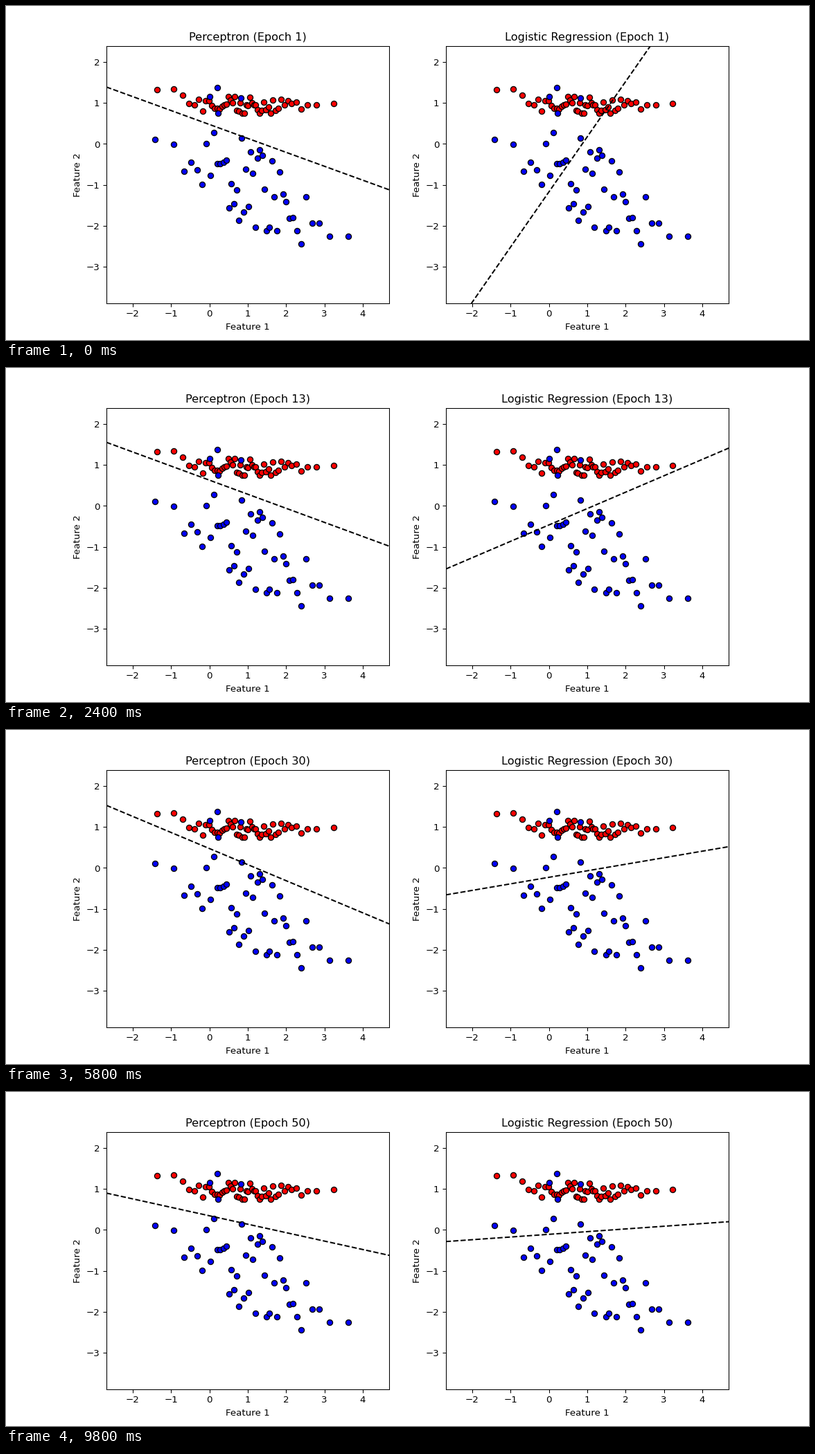
Write a matplotlib script that moves like this. It is 1159 px wide and 483 px high and loops after 10000 ms.

```python
import numpy as np
import matplotlib.pyplot as plt
from matplotlib.animation import FuncAnimation

EPOCHS = 50
X_LIM = (-2.69, 4.69)
Y_LIM = (-3.89, 2.39)

rng = np.random.default_rng(7)


def normal_quantiles(count):
    """Evenly ranked values of a standard normal distribution."""
    p = (np.arange(count) + 0.5) / count
    return 4.91 * (p**0.14 - (1 - p)**0.14)


def red_cluster():
    """Flat strip that rises a little at its left end."""
    x = 0.93 + 0.99 * normal_quantiles(50)
    rise = 0.36 * np.clip(-x, 0, 1)**2
    spread = 0.22 * np.exp(-((x - 0.9) / 2)**2)
    return x, 0.95 + rise + spread * rng.uniform(-1, 1, x.size)


def blue_cluster():
    """Falling cloud, thickest in the middle, with strays inside the strip."""
    x = 1.1 + 1.1 * normal_quantiles(46)
    spread = 1.2 * np.exp(-((x - 1.1) / 1.9)**2)
    y = -1.1 - 0.5 * (x - 1.1) + spread * rng.uniform(-1, 1, x.size)
    return np.r_[x, 0.01, 0.2, 0.22, 0.82], np.r_[y, 1.16, 1.37, 0.75, 1.12]


def perceptron_edges(epoch):
    """Unsteady boundary: drifts, and dips on the right every sixth epoch."""
    left = np.interp(epoch, [1, 9, 49, 50], [1.39, 1.56, 1.5, 0.9])
    right = np.interp(epoch, [1, 9, 26, 35, 43, 50],
                      [-1.12, -0.86, -1.38, -1.35, -0.73, -0.62])
    dip = 0.7 if epoch % 6 == 4 else 0
    return left, right - dip


def logistic_edges(epoch):
    """Boundary that flattens smoothly while its root moves right."""
    slope = 9.17 / (epoch + 5.34) - 0.1
    root = 1.87 - 1.03 * np.exp(-epoch / 35)
    return [slope * (x - root) for x in X_LIM]


MODELS = [("Perceptron", perceptron_edges),
          ("Logistic Regression", logistic_edges)]
CLUSTERS = [(red_cluster(), "red"), (blue_cluster(), "blue")]

plt.rcParams["font.family"] = "DejaVu Sans"
# 1159 x 483 pixels
fig, axes = plt.subplots(1, 2, figsize=(12, 5.001), dpi=96.5834)
lines = []
for ax in axes:
    for (x, y), color in CLUSTERS:
        ax.scatter(x, y, c=color, edgecolors="k")
    lines += ax.plot(X_LIM, (0, 0), "k--")
    ax.set(xlim=X_LIM, ylim=Y_LIM, xlabel="Feature 1", ylabel="Feature 2")


def update(frame):
    epoch = frame + 1
    for ax, line, (name, edges) in zip(axes, lines, MODELS):
        line.set_ydata(edges(epoch))
        ax.set_title(f"{name} (Epoch {epoch})")
    return lines


anim = FuncAnimation(fig, update, frames=EPOCHS, interval=200, repeat=True)
plt.show()
```
